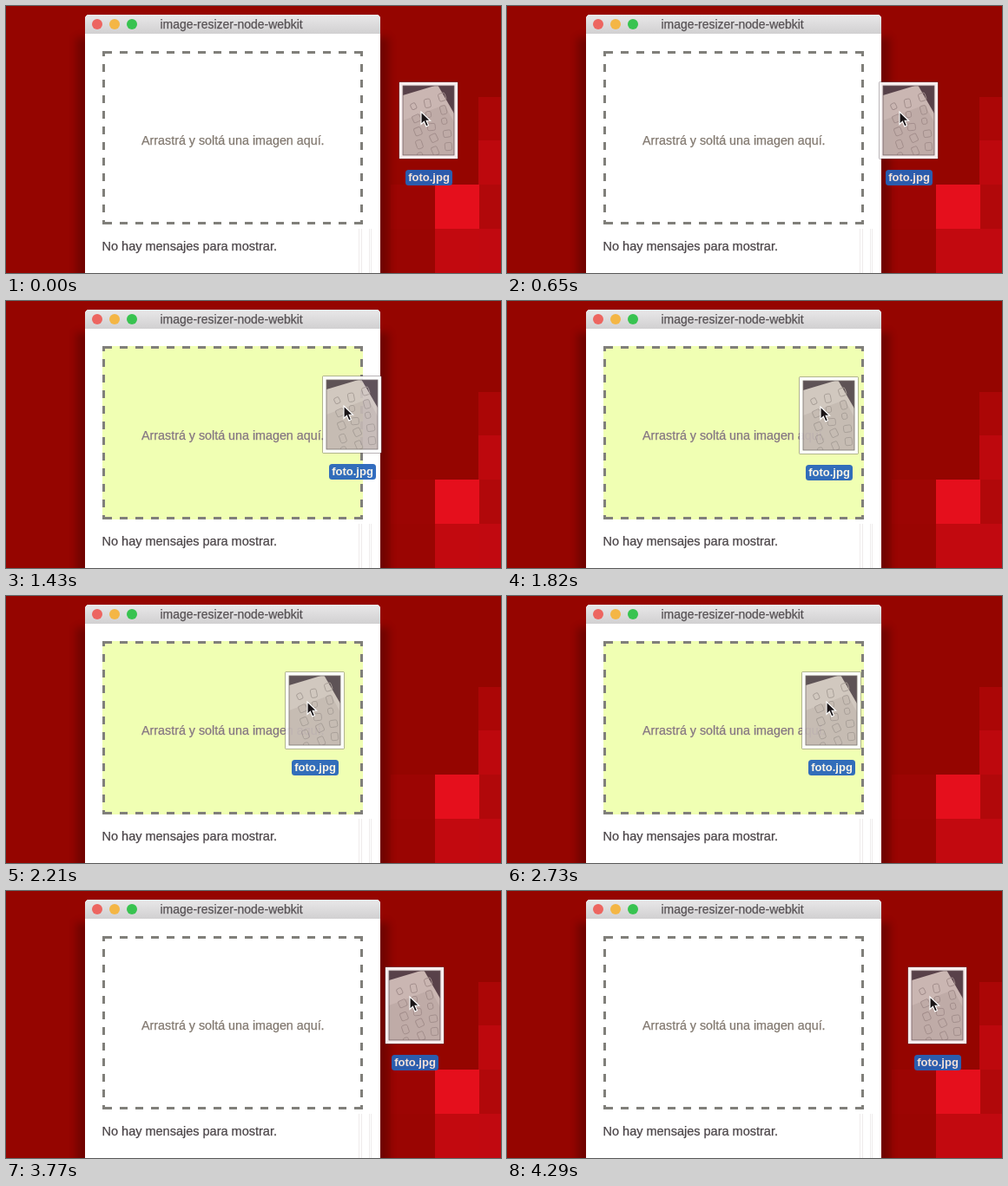
Recreate the animation shown at these times as an HTML page. Size 570x308 px, loop 4.42 s.

```html
<!DOCTYPE html>
<html lang="es">
<head>
<meta charset="utf-8">
<style>
  html, body { margin: 0; width: 100%; height: 100%; overflow: hidden; background: #950500; }
  svg { display: block; width: 570px; height: 308px; }
  text { font-family: "Liberation Sans", Arial, sans-serif; }
  .heavy { stroke: currentColor; fill: currentColor; stroke-width: .25; }
</style>
</head>
<body>
<svg viewBox="0 0 570 308">
  <defs>
    <linearGradient id="bar" x2="0" y2="1">
      <stop stop-color="#e9e8e9"/><stop offset="1" stop-color="#d1d0d1"/>
    </linearGradient>
    <filter id="blur" x="-20%" width="140%" y="-20%" height="140%"><feGaussianBlur stdDeviation="5"/></filter>
    <clipPath id="crop"><path d="M4 4h59v80H4z"/></clipPath>
  </defs>

  <rect width="570" height="308" fill="#950500"/>
  <g id="tiles"></g>

  <rect x="81" y="36" width="360" height="320" filter="url(#blur)" opacity=".24"/>
  <path d="M91 308V15q0-5 5-5H426q5 0 5 5V308z" fill="#fff"/>
  <path d="M91 32V15q0-5 5-5H426q5 0 5 5V32z" fill="url(#bar)"/>
  <circle cx="105" cy="21" r="6" fill="#ed6560"/>
  <circle cx="125" cy="21" r="6" fill="#f4b645"/>
  <circle cx="145" cy="21" r="6" fill="#38c350"/>
  <text class="heavy" x="177.5" y="26" font-size="13.95" color="#575255">image-resizer-node-webkit</text>

  <rect id="zone" x="111" y="52" width="300" height="200"/>
  <g stroke="#807f7a" stroke-width="3">
    <path d="M114 53.5H408M114 250.5H408" stroke-dasharray="9" stroke-dashoffset="1"/>
    <path d="M112.5 55V249M409.5 55V249" stroke-dasharray="9" stroke-dashoffset="6"/>
    <path d="M111 53.5h3M408 53.5h3M111 250.5h3M408 250.5h3"/>
  </g>
  <text id="hint" class="heavy" x="156" y="160" font-size="14.3">Arrastrá y soltá una imagen aquí.</text>
  <text class="heavy" x="110.5" y="282" font-size="14.5" color="#4b4548">No hay mensajes para mostrar.</text>
  <path d="M406.5 257V308M409.5 257V308M418.5 257V308M420.5 257V308" stroke="#efecec"/>

  <g id="file" opacity=".93">
    <rect x="-.5" y="-.5" width="68" height="89" rx="1" fill="none" stroke="#6b5f66" opacity=".5"/>
    <rect width="67" height="88" fill="#fff"/>
    <g clip-path="url(#crop)">
      <rect x="4" y="4" width="59" height="80" fill="#54464f"/>
      <path d="M4 15L44 3L63 36V84H4z" fill="#cfc4c0"/>
      <path d="M4 44L52 26L63 46V84H4z" fill="#c3b8b4"/>
      <g id="doodles" fill="none" stroke="#a39896" stroke-width=".9"></g>
    </g>
    <rect x="4" y="4" width="59" height="80" fill="none" stroke="#71666a" stroke-width=".8"/>
    <rect x="7" y="101" width="54" height="18" rx="3.5" fill="#2463bb"/>
    <text x="34" y="114" text-anchor="middle" font-size="13" font-weight="bold" fill="#fbf3ea">foto.jpg</text>
  </g>
  <path id="cursor" d="M0 0V14.5L3.4 11.3L5.8 17L8.5 15.8L6.1 10.3H10.6z" fill="#191416" stroke="#fff" stroke-width="1.1"/>
</svg>
<script>
const $ = id => document.getElementById(id);
const STEP = 130, LOOP = 4420;

// Desktop mosaic: x, y, colour
$("tiles").innerHTML = [
  [544, 105, "#ab0606"], [544, 155, "#bd080d"],
  [443, 206, "#9c0503"], [494, 206, "#e50f1c"], [545, 206, "#b1080a"],
  [443, 257, "#9a0502"], [494, 257, "#c2090f"], [545, 257, "#c10910"]
].map(([x, y, c]) => `<rect x="${x}" y="${y}" width="51" height="51" fill="${c}"/>`).join("");

// Tilted rows of small sketches on the paper
let sketches = "";
for (let i = 0; i < 15; i++) {
  const col = i % 3, row = Math.floor(i / 3);
  const x = 12 + col * 16 + row * 2, y = 26 + row * 14 - col * 6;
  sketches += `<rect x="${x}" y="${y}" width="${6 + i * 5 % 4}" height="${7 + i * 3 % 4}"
    rx="2" transform="rotate(${-28 + i * 17 % 24} ${x} ${y})"/>`;
}
$("doodles").innerHTML = sketches;

// Drag path: time, file left, file top, pointer x
const keys = [
  [0, 453, 88, 478], [1040, 404, 88, 426], [1430, 365, 87, 389], [2210, 322, 88, 347],
  [2730, 340, 88, 368], [3250, 393, 88, 424], [3900, 445, 88, 472], [4290, 462, 88, 487]
];

const secant = (i, k) => (keys[i + 1][k] - keys[i][k]) / (keys[i + 1][0] - keys[i][0]);

function slope(i, k) {
  if (i === 0 || i === keys.length - 1) return 0;
  const a = secant(i - 1, k), b = secant(i, k);
  return a * b > 0 ? 2 * a * b / (a + b) : 0;
}

// Monotone cubic through the keys, holding the last one
function sample(time, k) {
  const t = Math.min(time, keys[keys.length - 1][0]);
  let i = 0;
  while (i < keys.length - 2 && t >= keys[i + 1][0]) i++;
  const span = keys[i + 1][0] - keys[i][0], u = (t - keys[i][0]) / span, v = 1 - u;
  return keys[i][k] * v * v * (1 + 2 * u) + keys[i + 1][k] * u * u * (3 - 2 * u)
    + span * u * v * (slope(i, k) * v - slope(i + 1, k) * u);
}

function draw(now) {
  const t = Math.floor(now % LOOP / STEP) * STEP;
  const [x, y, pointer] = [1, 2, 3].map(k => Math.round(sample(t, k)));
  const over = pointer < 411;
  $("zone").setAttribute("fill", over ? "#f0ffb3" : "#fff");
  $("hint").setAttribute("color", over ? "#857683" : "#827970");
  $("file").setAttribute("transform", `translate(${x} ${y})`);
  $("cursor").setAttribute("transform", `translate(${pointer} ${y + 34})`);
}

const start = performance.now();
function tick() {
  draw(performance.now() - start);
  requestAnimationFrame(tick);
}
tick();
</script>
</body>
</html>
```
